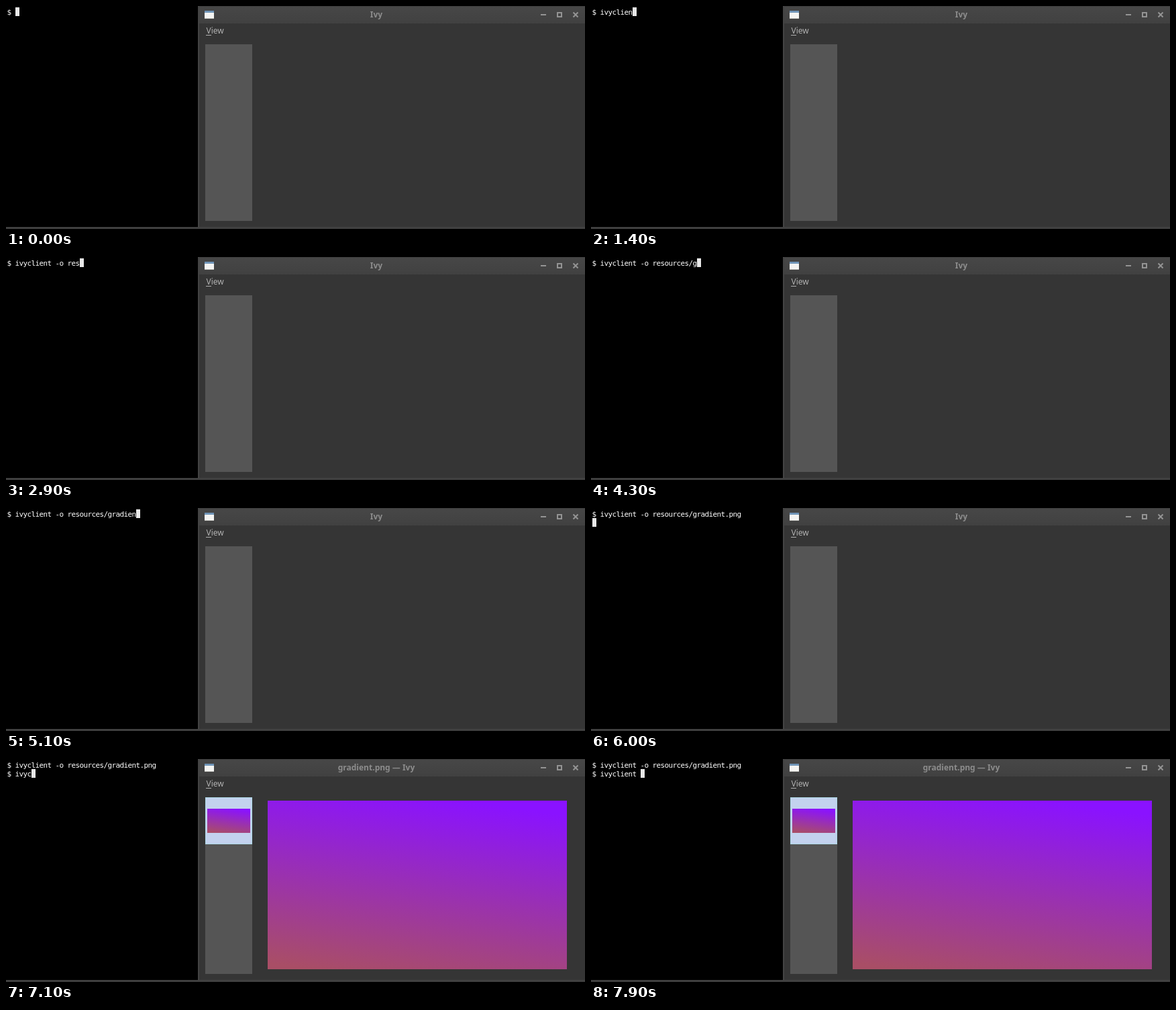
Animation of 863 by 332 pixels, one loop 8000 ms. Source, as an HTML page:

```html
<!DOCTYPE html>
<html lang="en">
<head>
<meta charset="utf-8">
<title>Ivy client</title>
<style>
html, body { margin: 0; width: 100%; height: 100%; overflow: hidden; background: #353535; }
svg { display: block; }
.term { font: 11px "DejaVu Sans Mono", monospace; letter-spacing: -.62px; fill: #fff; white-space: pre; }
.ui { font: 12px "Noto Sans", sans-serif; fill: #b0b0b0; }
#title { font-weight: bold; fill: #8c8c8c; text-anchor: middle; }
.image { background: linear-gradient(8deg, #a94e66 3%, #8a12ff 93%); position: absolute; }
#main { left: 390px; top: 62px; width: 446px; height: 251px; }
#thumb { left: 300px; top: 74px; width: 64px; height: 36px; }
</style>
</head>
<body>
<svg width="863" height="332" viewBox="0 0 863 332">
  <defs>
    <linearGradient id="bar" x2="0" y2="1">
      <stop stop-color="#474747"/><stop offset="1" stop-color="#414141"/>
    </linearGradient>
  </defs>
  <rect width="287" height="329"/>
  <rect x="286" width="2" height="332" fill="#434343"/>
  <rect x="288" width="575" height="26" fill="url(#bar)"/>
  <rect x="288" width="575" height="1" fill="#3a3a3a"/>
  <rect y="329" width="863" height="1" fill="#484848"/>
  <rect y="330" width="863" height="2" fill="#3b3b3b"/>

  <rect x="296" y="7" width="14" height="12" fill="#f4f4f2"/>
  <rect x="296" y="7" width="14" height="3" fill="#7095b8"/>
  <rect x="296" y="18" width="14" height="1" fill="#c4c4c0"/>
  <g fill="none" stroke="#949494" stroke-width="2">
    <path d="M797 13h8M845.5 9.5l7 7M852.5 9.5l-7 7"/>
    <rect x="822" y="10" width="6" height="6"/>
  </g>
  <text id="title" class="ui" x="552" y="17"></text>
  <text class="ui" x="298.5" y="41">View</text>
  <rect x="298" y="43" width="8" height="1" fill="#b0b0b0"/>

  <rect x="297" y="57" width="70" height="263" fill="#555"/>
  <rect id="selected" x="297.5" y="57.5" width="69" height="69" fill="#c3d2ee" stroke="#add8e6"/>

  <text id="line1" class="term" x="1.5" y="13"></text>
  <text id="line2" class="term" x="1.5" y="26"></text>
  <rect id="cursor" width="6" height="13" fill="#e8e8e8"/>
</svg>
<div id="main" class="image"></div>
<div id="thumb" class="image"></div>
<script>
const LOOP = 8000, ENTER = 6000, OPEN = 6100;
const $ = id => document.getElementById(id);

// Key press times in tenths of a second
const first = {
  text: 'ivyclient -o resources/gradient.png',
  keys: [3, 5, 6, 9, 10, 12, 13, 14, 15, 16, 18, 21, 22, 26, 27, 29, 30, 31, 31, 33, 34,
    36, 39, 43, 45, 46, 47, 49, 50, 51, 52, 53, 56, 57, 58]
};
const second = { text: 'ivyclient ', keys: [65, 67, 68, 71, 72, 73, 74, 75, 76, 79] };

const typed = ({ text, keys }, t) =>
  '$ ' + text.slice(0, keys.filter(k => k * 100 <= t).length);

function draw() {
  const t = performance.now() % LOOP;
  const entered = t >= ENTER, open = t >= OPEN;
  const line1 = typed(first, t), line2 = open ? typed(second, t) : '';
  $('line1').textContent = line1;
  $('line2').textContent = line2;
  $('cursor').setAttribute('x', 2 + 6 * (entered ? line2 : line1).length);
  $('cursor').setAttribute('y', entered ? 15 : 2);
  $('title').textContent = open ? 'gradient.png — Ivy' : 'Ivy';
  for (const id of ['selected', 'main', 'thumb'])
    $(id).style.visibility = open ? 'visible' : 'hidden';
  requestAnimationFrame(draw);
}
draw();
</script>
</body>
</html>
```
